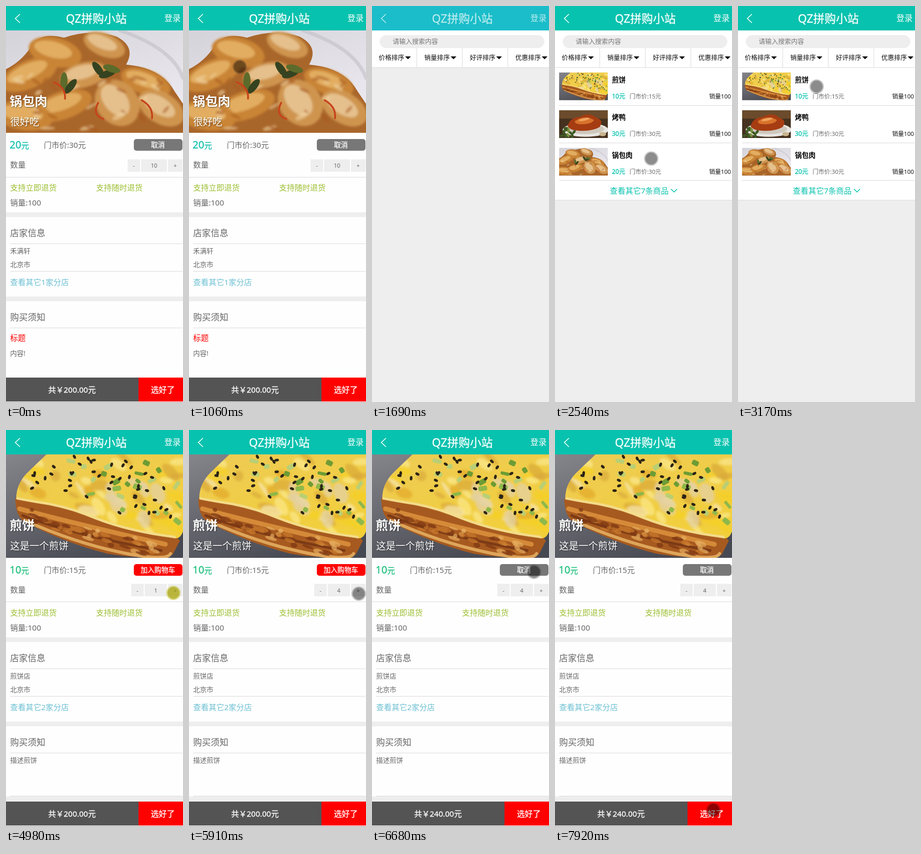
Recreate the animation shown at these times as an HTML page. Size 342 by 762 pixels, loop 8 s.

```html
<!DOCTYPE html>
<html lang="zh-CN">
<head>
<meta charset="utf-8">
<title>团购</title>
<style>
html, body { margin: 0; width: 100%; height: 100%; overflow: hidden; background: #fff; }
svg { display: block; }
#stage { width: 100vw; height: 100vh; }
text { font-family: "Noto Sans", "Noto Sans CJK SC", "Noto Sans CJK", sans-serif; white-space: pre; }
.mid { text-anchor: middle; }
.end { text-anchor: end; }
.bold { font-weight: 700; }
.semi { stroke: currentColor; stroke-width: .3px; }
.shade { filter: drop-shadow(1px 1px 1px rgba(0, 0, 0, .45)); }
</style>
</head>
<body>
<svg id="stage" viewBox="0 0 342 762" preserveAspectRatio="none"></svg>
<script>
const LOOP = 8000;
const TEAL = '#07c2ae', RULE = '#dcdcdc', GREY = '#eee';

let seed = 11;
const rnd = (a = 0, b = 1) => {
  seed = (seed * 16807) % 2147483647;
  return a + (b - a) * seed / 2147483647;
};
const pick = (...items) => items[Math.floor(rnd(0, items.length))];
const many = (n, make) => Array.from({ length: n }, (_, i) => make(i)).join('');

const rect = (x, y, w, h, fill, r = 0, more = '') =>
  `<rect x="${x}" y="${y}" width="${w}" height="${h}" rx="${r}" fill="${fill}" ${more}/>`;
const path = (d, fill, more = '') => `<path d="${d}" fill="${fill}" ${more}/>`;
const line = (d, color, width, more = '') =>
  path(d, 'none', `stroke="${color}" stroke-width="${width}" stroke-linecap="round" ${more}`);
const oval = (x, y, rx, ry, turn, fill, more = '') =>
  `<ellipse rx="${rx}" ry="${ry}" fill="${fill}" transform="translate(${x} ${y}) rotate(${turn})" ${more}/>`;
const rule = (y, x = 8, w = 333) => rect(x, y, w, 1, RULE);
// cy is the vertical middle of the characters
const text = (x, cy, size, s, fill = '#666', cls = '', more = '') =>
  `<text x="${x}" y="${cy + size * .37}" font-size="${size}" fill="${fill}" color="${fill}" class="${cls}" ${more}>${s}</text>`;
const photo = (id, x, y, w, h) => `<use href="#${id}" x="${x}" y="${y}" width="${w}" height="${h}"/>`;
const symbol = (id, body) =>
  `<symbol id="${id}" viewBox="0 0 342 198" preserveAspectRatio="none">${body}</symbol>`;
const fade = (id, from, to) =>
  `<linearGradient id="${id}" x1="0" y1="0" x2=".6" y2="1"><stop stop-color="${from}"/><stop offset="1" stop-color="${to}"/></linearGradient>`;

function pancake() {
  const lip = 'M20 86Q50 92 84 97Q130 106 172 124Q236 149 324 160';
  const top = 'M20 86Q18 60 40 36L78 0H342V148Q336 164 324 160Q236 149 172 124Q130 106 84 97Q50 92 20 86Z';
  return rect(0, 0, 342, 198, 'url(#slate)') +
    path('M18 84Q18 116 34 128Q110 168 196 190Q270 202 322 192L336 165L300 130L30 76Z', '#a75a1f') +
    line('M26 104Q130 132 308 172', '#d48a38', 9) +
    line('M32 117Q130 154 300 184', '#7c3a15', 5) +
    line('M38 127Q130 168 220 187T318 190', '#dda55a', 6) +
    many(44, () => {
      const x = rnd(50, 300);
      return oval(x, 84 + x * .27 + rnd(8, 36), rnd(4, 12), rnd(2, 5), 18, pick('#7a3512', '#c9792c', '#e6ad5e'), 'opacity=".7"');
    }) +
    `<clipPath id="crust">${path(top, '#000')}</clipPath><g clip-path="url(#crust)">` +
    path(top, 'url(#egg)') +
    `<g filter="url(#soft)">` +
    many(46, () => oval(rnd(20, 342), rnd(0, 155), rnd(8, 26), rnd(4, 11), rnd(-10, 60),
      pick('#fbe98f', '#f7e7b4', '#e3a92c', '#d9a93a', '#f6d023'), 'opacity=".7"')) +
    many(7, () => oval(rnd(190, 335), rnd(20, 130), rnd(12, 24), rnd(8, 14), rnd(0, 90), '#e3d0a4', 'opacity=".75"')) +
    '</g>' + line(lip, '#f4dc8c', 9) + '</g>' +
    many(24, () => {
      const x = rnd(115, 335);
      return rect(-6, -4, rnd(9, 18), rnd(6, 11), pick('#6d9c34', '#8fb84a', '#b9cf74'), 3,
        `transform="translate(${x} ${rnd(8, 60 + x * .25)}) rotate(${rnd(-60, 60)})"`);
    }) +
    many(46, () => {
      const x = rnd(40, 330);
      return oval(x, rnd(Math.max(4, 50 - x * .6), 72 + x * .2), 2.6, 4.2, rnd(0, 180), '#2b2416');
    });
}

function pork() {
  const chunks = [
    [95, 42, 52, 28, 14], [190, 28, 42, 22, 22], [45, 85, 58, 27, -24], [150, 86, 46, 24, -14],
    [270, 100, 50, 24, 20], [215, 140, 48, 40, 50], [110, 145, 58, 27, -18], [300, 150, 48, 30, 32], [35, 165, 56, 28, 8]
  ];
  return rect(0, 0, 342, 198, 'url(#plate)') +
    line('M220 0Q322 34 342 92', '#c3c0c9', 7, 'opacity=".6"') +
    path('M0 75Q30 60 48 32Q64 2 112 14Q165-4 214 12Q252 32 232 66Q300 72 326 118L342 142V198H0Z', '#a9662a') +
    '<g filter="url(#soft)">' +
    chunks.map(([x, y, a, b, r], i) =>
      oval(x, y, a, b, r, i % 2 ? '#cf9550' : '#c98435') +
      oval(x - 4, y - 5, a * .72, b * .55, r, i % 2 ? '#e5c08c' : '#e2ad61')).join('') +
    many(34, () => oval(rnd(10, 325), rnd(75, 190), rnd(5, 15), rnd(2, 5), rnd(-50, 50), pick('#f0d3a2', '#a8581f'), 'opacity=".6"')) +
    '</g>' +
    [[196, 84], [204, 74], [178, 75], [112, 98], [125, 108]].map(([x, y], i) =>
      oval(x, y, 17, 7, i * 37 - 20, i % 2 ? '#5c6b2b' : '#354320')).join('') +
    line('M178 140Q166 164 188 171M92 100Q116 110 114 132M262 135Q285 148 282 170', '#c6431b', 3.5);
}

function duck() {
  return rect(0, 0, 342, 198, '#45311f') + rect(0, 0, 342, 60, '#6b4b2c') +
    oval(185, 140, 160, 50, 0, '#e8e6e2') + oval(185, 134, 132, 36, 0, '#cfc8bd') +
    path('M60 115Q70 55 145 48Q215 8 262 55Q318 72 284 120Q230 152 140 146Q80 146 60 115Z', '#a63c12') +
    path('M110 78Q180 30 245 70Q230 100 150 100Q110 100 110 78Z', '#d8732c') +
    oval(175, 66, 40, 9, -12, '#efa35f') +
    many(14, () => oval(rnd(10, 105), rnd(130, 190), 16, 9, rnd(0, 180), pick('#3d5a24', '#7c9040'))) +
    oval(306, 170, 24, 15, 0, '#c9b58e');
}

function detail(p) {
  const o = p.shift;
  const cells = [[p.minusX, 24], [p.minusX + 26, 285 - p.minusX], [313, 28]];
  const marks = ['-', p.count, '+'];
  return rect(0, 47, 342, 715, '#fefefe') + photo(p.photo, 0, 47, 342, 197 + o) +
    text(7, 183, 24.3, p.name, '#fff', 'bold shade') + text(8, 223, 18.8, p.note, '#fff', 'shade') +
    text(7, 267 + o, 19.5, p.price, p.color, 'semi') + text(29.5, 268 + o, 15, '元', p.color, 'semi') +
    text(73, 267 + o, 15, `门市价:${p.market}元`) +
    rect(247, 256 + o, 94, 22.5, '#777', 5, `id="${p.photo}Button"`) +
    text(293.5, 267 + o, 13.3, '取消', '#fff', 'mid semi', `id="${p.photo}Label"`) +
    text(8, 305.5 + o, 15, '数量') +
    cells.map(([x, w], i) => rect(x, 295 + o * .5, w, 24, GREY) +
      text(x + w / 2, 307 + o, 11, marks[i], '#666', 'mid', i == 1 ? `id="${p.photo}Count"` : '')).join('') +
    rule(329 + o * .5, 0, 342) +
    text(8, 349 + o, 15, '支持立即退货', '#9dbf33') + text(174, 349 + o, 15, '支持随时退货', '#9dbf33') +
    text(8, 378 + o, 15, '销量:100') +
    rect(0, 397 + o, 342, 9, GREY) + text(8, 437 + o, 17, '店家信息') + rule(457 + o) +
    text(8, 471 + o, 13, p.shop) + text(8, 497 + o, 13, '北京市') + rule(510 + o) +
    text(8, 531 + o, 15, `查看其它${p.branches}家分店`, '#6cc0d3') +
    rect(0, 559 + o, 342, 9, GREY) + text(8, 599 + o, 17, '购买须知') + rule(619 + o) +
    p.terms +
    rect(0, 715, 342, 46, '#545454') + rect(256, 715, 86, 46, '#f00') +
    text(127.5, 738, 15, '共￥200.00元', '#fff', 'mid semi', `id="${p.photo}Total"`) +
    text(303, 738, 15.3, '选好了', '#fff', 'mid semi');
}

function list() {
  const rows = [['pancake', '煎饼', 10, 15], ['duck', '烤鸭', 30, 30], ['pork', '锅包肉', 20, 30]];
  const sorts = ['价格', '销量', '好评', '优惠'];
  return rect(0, 47, 342, 715, GREY) + rect(0, 47, 342, 72, '#fff') +
    rect(15, 56, 318, 25, GREY, 12.5) + text(40, 68, 12.5, '请输入搜索内容', '#777') +
    sorts.map((s, i) => text(13 + i * 88, 99.5, 12.3, s + '排序', '#111') +
      path(`M${64 + i * 88} 97h11l-5.5 5.5z`, '#000') +
      (i ? rect(i * 88 - 2, 81, 1, 38, RULE) : '')).join('') +
    rule(118, 0, 342) +
    '<g id="rows">' + rect(0, 119, 342, 254, '#fff') +
    rows.map(([id, name, price, market], i) => {
      const y = 128 + i * 72.5;
      return photo(id, 8, y, 94, 53.5) + text(110, y + 14, 13.3, name, '#000', 'bold') +
        text(110, y + 45.5, 12, price + '元', TEAL, 'semi') +
        text(144, y + 45.5, 11.3, `门市价:${market}元`) +
        text(340, y + 45.5, 11.3, '销量100', '#111', 'end') + rule(191 + i * 72);
    }).join('') +
    text(106, 355, 15, '查看其它7条商品', TEAL) + line('M224.5 352.5l5.5 5.5l5.5-5.5', TEAL, 1.5) +
    rule(373, 0, 342) + '</g>';
}

const stage = document.getElementById('stage');
stage.innerHTML =
  `<defs>${fade('slate', '#85858b', '#474952')}${fade('egg', '#eecb55', '#f2cf3c')}${fade('plate', '#d5d3da', '#eceaf0')}
  <filter id="soft"><feGaussianBlur stdDeviation="2"/></filter>
  ${symbol('pancake', pancake())}${symbol('pork', pork())}${symbol('duck', duck())}</defs>` +
  '<g id="porkPage">' + detail({
    shift: 0, photo: 'pork', name: '锅包肉', note: '很好吃', price: 20, market: 30, color: '#10bfae',
    minusX: 235, count: 10, shop: '禾满轩', branches: 1,
    terms: text(8, 638, 15, '标题', '#f00') + text(8, 668, 13, '内容!')
  }) + '</g><g id="listPage">' + list() + '</g><g id="pancakePage">' + detail({
    shift: 2, photo: 'pancake', name: '煎饼', note: '这是一个煎饼', price: 10, market: 15, color: '#1cbf7c',
    minusX: 242, count: 1, shop: '煎饼店', branches: 2,
    terms: text(8, 635, 13, '描述煎饼') + rule(704) + rect(0, 705, 342, 10, GREY)
  }) + '</g>' +
  rect(0, 0, 342, 47, TEAL, 0, 'id="bar"') + '<g id="barText">' +
  line('M26.5 16l-8.5 8l8.5 8', '#fff', 1.5) +
  text(174.5, 24, 22, 'QZ拼购小站', '#fff', 'mid semi') + text(306, 23, 15.7, '登录', '#fff') + '</g>' +
  '<g id="status">' + path('M0 733H111Q113 733 113 735V761H0Z', '#fff') + text(4, 748, 15, '正在连接...') + '</g>' +
  '<g id="touch"><circle r="12.5" fill="none" stroke-width="2.6"/><circle r="11.4"/></g>';

const el = {};
stage.querySelectorAll('[id]').forEach(n => el[n.id] = n);
const [ring, dot] = el.touch.children;

// [time, x, y] per visible stretch of the touch point
const tracks = [
  [[680, 290, 460], [760, 190, 290], [830, 103, 131], [980, 103, 131], [1060, 98, 117], [1610, 98, 117]],
  [[2400, 175, 436], [2540, 186, 294], [2760, 165, 170], [3170, 152, 155], [3320, 152, 155],
   [3480, 317, 320], [3560, 317, 320], [4110, 312, 317], [4200, 312, 317], [4260, 319, 314], [4430, 319, 314],
   [4500, 323.5, 313.5], [5360, 323.5, 313.5], [5450, 328, 315], [5980, 328, 315], [6220, 313, 273],
   [7460, 313, 273], [7900, 306, 731], [LOOP, 306, 731]]
];
const presses = [[3090, 3170], [4980, 5050], [5680, 5760], [5830, 5900], [6600, 6680]];
const counts = [[5050, 2], [5760, 3], [5900, 4]];

const within = (t, a, b) => t >= a && t < b;
const show = (node, on) => node.style.display = on ? '' : 'none';
const mix = (a, b, k) => a + (b - a) * k;

function drawTouch(t) {
  const track = tracks.find(k => within(t, k[0][0], k.at(-1)[0]));
  show(el.touch, track);
  if (!track) return;
  const i = track.findIndex(k => k[0] > t);
  const [t0, x0, y0] = track[i - 1], [t1, x1, y1] = track[i];
  const k = (t - t0) / (t1 - t0);
  el.touch.setAttribute('transform', `translate(${mix(x0, x1, k)} ${mix(y0, y1, k)})`);
  const pressed = presses.some(p => within(t, ...p));
  dot.setAttribute('fill', pressed ? 'rgba(165,160,0,.75)' : 'rgba(0,0,0,.45)');
  ring.setAttribute('stroke', pressed ? 'rgba(190,186,20,.5)' : 'rgba(40,40,40,.28)');
}

function render(t) {
  show(el.porkPage, t < 1610);
  show(el.listPage, within(t, 1610, 3320));
  show(el.pancakePage, t >= 3320);
  show(el.rows, t >= 1840);
  show(el.status, within(t, 3320, 4110));

  const tint = within(t, 1610, 2080) ? Math.min(1, (2080 - t) / 320) : 0;
  el.bar.setAttribute('fill', `rgb(${mix(7, 26, tint)},${mix(194, 189, tint)},${mix(174, 201, tint)})`);
  el.barText.setAttribute('opacity', 1 - .3 * tint);

  const added = t >= 6680;
  el.pancakeButton.setAttribute('fill', added ? '#777' : '#f00');
  el.pancakeLabel.textContent = added ? '取消' : '加入购物车';
  el.pancakeTotal.textContent = `共￥${added ? 240 : 200}.00元`;
  el.pancakeCount.textContent = counts.reduce((n, [at, value]) => t >= at ? value : n, 1);
  drawTouch(t);
}

const start = performance.now();
function tick() {
  render((performance.now() - start) % LOOP);
  requestAnimationFrame(tick);
}
tick();
</script>
</body>
</html>
```
